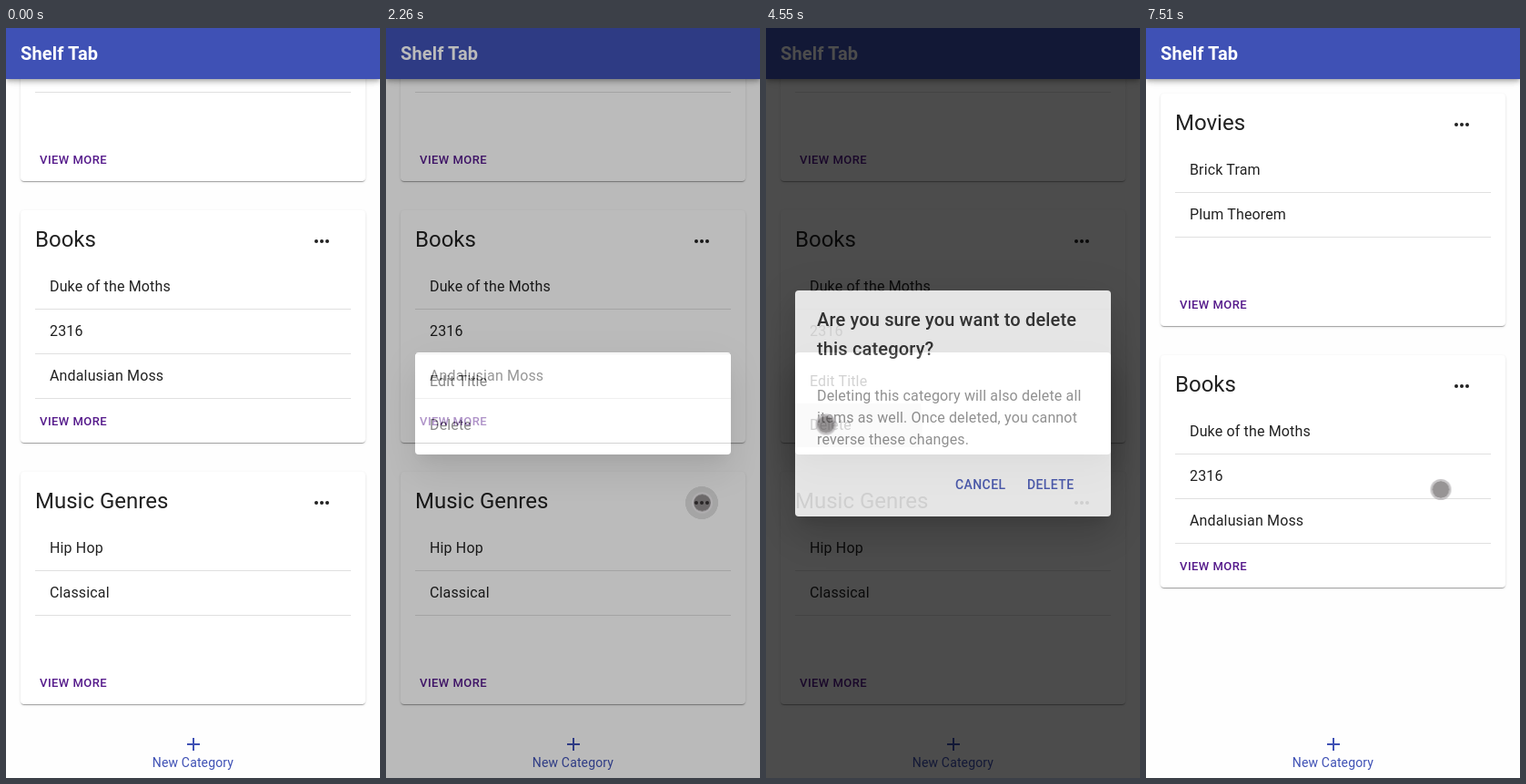
An HTML page that plays this animation: 411x823 px, repeating every 8000 ms.

```html
<!DOCTYPE html>
<html lang="en">
<head>
<meta charset="utf-8">
<title>Category list</title>
<style>
  html, body { margin: 0; width: 100%; height: 100%; overflow: hidden; background: #fefefe; }
  body { position: relative; font: 16px/24px Roboto, sans-serif; letter-spacing: .15px; color: rgba(0, 0, 0, .87); white-space: nowrap; }
  h1, h2, ul, p { margin: 0; padding: 0; font-weight: 400; list-style: none; }
  .stage { position: absolute; left: 0; top: 0; width: 411px; height: 823px; overflow: hidden; }
  .stage div, .stage h1, .cap, .ripple { position: absolute; }

  .bar { left: 0; top: 0; width: 411px; height: 56px; background: #3f51b5;
    box-shadow: 0 2px 4px -1px rgba(0,0,0,.2), 0 4px 5px rgba(0,0,0,.14), 0 1px 10px rgba(0,0,0,.12); }
  .bar h1 { left: 16px; top: 12px; font: 700 20px/32px Roboto, sans-serif; color: #fff; }

  .list { left: 16px; top: 72px; animation: scroll 8s step-end infinite; }
  .card { width: 379px; height: 255px; border-radius: 4px; background: #fff;
    box-shadow: 0 2px 1px -1px rgba(0,0,0,.2), 0 1px 1px rgba(0,0,0,.14), 0 1px 3px rgba(0,0,0,.12); }
  .card:nth-child(2) { top: 287px; }
  .card:nth-child(3) { top: 574px; animation: remove 8s step-end infinite; }
  .card h2 { position: absolute; left: 16px; top: 16px; font-size: 24px; line-height: 32px; letter-spacing: 0; }
  .card ul { position: absolute; left: 16px; top: 60px; width: 347px; }
  .card li { padding-left: 16px; line-height: 48px; border-bottom: 1px solid rgba(0,0,0,.12); }
  .cap { font-weight: 500; font-size: 14px; letter-spacing: .4px; color: #3f51b5; }
  .card .cap { left: 21px; top: 216px; font-size: 13px; line-height: 31px; letter-spacing: .46px; color: #551a8b; }
  .more { left: 299px; top: 16px; width: 64px; height: 36px; border-radius: 4px; overflow: hidden; }
  .more::before { content: ""; position: absolute; left: 30px; top: 16px; width: 4px; height: 4px; border-radius: 50%;
    background: currentColor; box-shadow: -6px 0, 6px 0; }

  .nav { left: 0; top: 767px; width: 411px; height: 56px; background: #fefefe; color: #3f51b5; text-align: center; }
  .nav::before, .nav::after { content: ""; position: absolute; background: currentColor; }
  .nav::before { left: 199px; top: 18px; width: 14px; height: 2px; }
  .nav::after { left: 205px; top: 12px; width: 2px; height: 14px; }
  .nav p { margin-top: 29px; font-size: 14px; line-height: 20px; }

  .layer { left: 0; top: 0; width: 411px; height: 823px; background: rgba(0,0,0,.5); opacity: 0; }
  .menu { animation: menu 8s step-end infinite; }
  .confirm { animation: confirm 8s step-end infinite; }
  .paper { left: 32px; width: 347px; border-radius: 4px; background: #fff;
    box-shadow: 0 11px 15px -7px rgba(0,0,0,.2), 0 24px 38px 3px rgba(0,0,0,.14), 0 9px 46px 8px rgba(0,0,0,.12); }
  .menu .paper { top: 356px; height: 112px; }
  .item { left: 0; width: 331px; height: 48px; padding-left: 16px; line-height: 48px; overflow: hidden; }
  .confirm .paper { top: 288px; height: 248px; }
  .confirm h2 { position: absolute; left: 24px; top: 16px; font: 500 20px/32px Roboto, sans-serif; letter-spacing: .15px; }
  .confirm p { position: absolute; left: 24px; top: 104px; color: rgba(0,0,0,.54); }
  .hit { left: 247px; top: 195px; width: 68px; height: 36px; border-radius: 4px; overflow: hidden; }

  .ripple { width: 100px; height: 100px; margin: -50px; border-radius: 50%; background: #000; opacity: 0; }
  .more .ripple { left: 32px; top: 18px; animation: ripple-more 8s step-end infinite; }
  .item .ripple { left: 34px; top: 22px; animation: ripple-item 8s step-end infinite; }
  .hit .ripple { left: 44px; top: 23px; background: #3f51b5; animation: ripple-hit 8s step-end infinite; }

  .touch { left: -11.5px; top: -11.5px; box-sizing: border-box; width: 23px; height: 23px; border-radius: 50%;
    border: 2px solid rgba(180,178,180,.75); background: rgba(60,53,56,.53) padding-box;
    animation: touch 8s step-end infinite; }

  @keyframes scroll { 0% { transform: translateY(-159px); } 93.875%, 100% { transform: none; } }
  @keyframes remove { 0% { visibility: visible; } 93.875%, 100% { visibility: hidden; } }
  @keyframes menu {
    0% { opacity: 0; } 28.25% { opacity: .53; } 29.125% { opacity: .94; }
    30.125% { opacity: 1; } 93.875%, 100% { opacity: 0; }
  }
  @keyframes confirm {
    0% { opacity: 0; } 55.875% { opacity: .08; } 56.875% { opacity: .8; }
    57.875% { opacity: .99; } 58.875% { opacity: 1; } 93.875%, 100% { opacity: 0; }
  }
  @keyframes ripple-more {
    0% { opacity: 0; }
    27.25% { opacity: .12; transform: scale(.2); }
    28.25% { opacity: .12; transform: scale(.36); }
    29.125% { opacity: .12; transform: scale(.49); }
    30.125% { opacity: .08; transform: scale(.62); }
    31.125% { opacity: .04; transform: scale(.7); }
    34.125%, 100% { opacity: 0; }
  }
  @keyframes ripple-item {
    0% { opacity: 0; }
    53.875% { opacity: .1; transform: scale(.4); }
    54.875% { opacity: .1; transform: scale(1); }
    55.875% { opacity: .1; transform: scale(1.6); }
    56.875% { opacity: .1; transform: scale(2.12); }
    58.875%, 100% { opacity: 0; }
  }
  @keyframes ripple-hit {
    0% { opacity: 0; }
    92% { opacity: .25; transform: scale(.3); }
    93% { opacity: .25; transform: scale(.6); }
    93.875%, 100% { opacity: 0; }
  }
  @keyframes touch {
    0% { transform: translate(-50px, -50px); }
    10.5% { transform: translate(328px, 816px); animation-timing-function: steps(3); }
    13.375% { transform: translate(345px, 745px); animation-timing-function: steps(3); }
    16.375% { transform: translate(356px, 630px); animation-timing-function: steps(4); }
    20.375% { transform: translate(347.5px, 528.5px); animation-timing-function: steps(3); }
    23.375% { transform: translate(347.5px, 521.5px); }
    25.25% { transform: translate(347px, 520.5px); }
    38% { transform: translate(342px, 518px); animation-timing-function: steps(3); }
    41% { transform: translate(250px, 490px); animation-timing-function: steps(3); }
    44% { transform: translate(140px, 455px); animation-timing-function: steps(4); }
    48% { transform: translate(70.5px, 435.5px); }
    49% { transform: translate(67px, 435px); }
    50% { transform: translate(66.5px, 434.5px); }
    51.875% { transform: translate(65.5px, 434.5px); }
    62.75% { transform: translate(80px, 438px); animation-timing-function: steps(3); }
    65.75% { transform: translate(200px, 474px); animation-timing-function: steps(2); }
    67.75% { transform: translate(285px, 498px); animation-timing-function: steps(2); }
    69.75% { transform: translate(323.5px, 506.5px); }
    90.125%, 100% { transform: translate(323.5px, 506px); }
  }
</style>
</head>
<body>
<div class="stage">
  <div class="list">
    <div class="card">
      <h2>Movies</h2><div class="more"></div>
      <ul><li>Brick Tram</li><li>Plum Theorem</li></ul>
      <span class="cap">VIEW MORE</span>
    </div>
    <div class="card">
      <h2>Books</h2><div class="more"></div>
      <ul><li>Duke of the Moths</li><li>2316</li><li>Andalusian Moss</li></ul>
      <span class="cap">VIEW MORE</span>
    </div>
    <div class="card">
      <h2>Music Genres</h2><div class="more"><i class="ripple"></i></div>
      <ul><li>Hip Hop</li><li>Classical</li></ul>
      <span class="cap">VIEW MORE</span>
    </div>
  </div>
  <div class="nav"><p>New Category</p></div>
  <div class="bar"><h1>Shelf Tab</h1></div>

  <div class="layer menu">
    <div class="paper">
      <div class="item" style="top:8px">Edit Title</div>
      <div class="item" style="top:56px">Delete<i class="ripple"></i></div>
    </div>
  </div>

  <div class="layer confirm">
    <div class="paper">
      <h2>Are you sure you want to delete<br>this category?</h2>
      <p>Deleting this category will also delete all<br>items as well. Once deleted, you cannot<br>reverse these changes.</p>
      <span class="cap" style="left:176px;top:201px">CANCEL</span>
      <span class="cap" style="left:255px;top:201px">DELETE</span>
      <div class="hit"><i class="ripple"></i></div>
    </div>
  </div>

  <div class="touch"></div>
</div>
</body>
</html>
```
